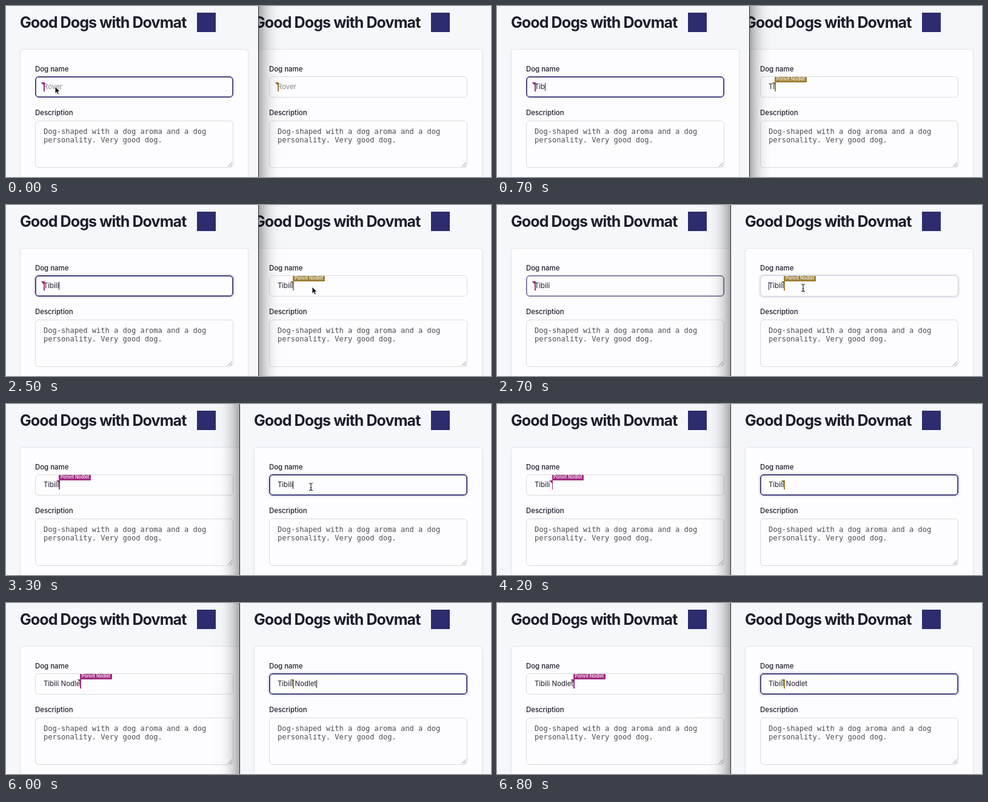
Write an HTML page that moves like this. It is 800 px wide and 282 px high and loops after 6900 ms.

```html
<!DOCTYPE html>
<html lang="en">
<head>
<meta charset="utf-8">
<title>Good Dogs</title>
<style>
  html, body { margin: 0; width: 100%; height: 100%; overflow: hidden; }
  body { position: relative; font: 11.4px Inter, sans-serif; font-optical-sizing: none; color: #1c1d2b; background: #f5f7fa; }
  i { font-style: normal; }
  .win { position: absolute; top: -60px; height: 402px; overflow: hidden; background: #f5f7fa; box-shadow: 0 0 30px rgba(0, 0, 0, .65); }
  #left { left: 0; width: 416px; border-right: 1px solid #26262c; }
  #right { left: 385px; width: 414px; border-left: 1px solid #26262c; }
  .page { position: absolute; left: 0; top: 60px; }
  .page > * { position: absolute; box-sizing: border-box; white-space: pre; }
  h1 { left: 23px; top: 12px; margin: 0; font-size: 25px; line-height: 30px; font-weight: 700; letter-spacing: -.9px; }
  .logo { left: 315px; top: 11px; width: 31px; height: 32px; background: #2d2c6e; }
  .card { left: 23px; top: 71px; width: 377px; height: 260px; background: #fdfcfe; border: 1px solid #e3e6ed; border-radius: 5px; box-shadow: 0 1px 3px rgba(30, 40, 70, .07); }
  .label { left: 48px; line-height: 16px; font-weight: 540; }
  .box { left: 48px; width: 327px; border: 1px solid #d9dce5; border-radius: 6px; background: #fdfcfe; }
  .input { top: 116px; height: 35px; }
  .area { top: 189px; height: 78px; padding: 10px 13px; font: 12.05px/14.4px "DejaVu Sans Mono", monospace; color: #4d4e54; }
  .grip { left: 366px; top: 258px; }
  .value { left: 62px; top: 126px; height: 15px; line-height: 15px; font-weight: 430; display: flex; }
  .hint { color: #85878e; }
  .local, .remote { position: relative; width: 0; }
  .local::after { content: ""; position: absolute; left: 0; top: 1px; width: 1px; height: 13px; background: #22232c; }
  .remote::before { content: ""; position: absolute; left: 0; top: 0; width: 1.5px; height: 15px; background: var(--ink); }
  .remote::after { content: ""; position: absolute; left: -4.5px; top: 0; width: 5px; height: 5px; background: color-mix(in srgb, var(--ink) 75%, #2a2a48); clip-path: polygon(0 0, 100% 0, 100% 100%); }
  .tag { position: absolute; left: 0; top: -9px; padding: 0 2.5px; font-size: 7.4px; line-height: 8.5px; font-weight: 500; color: #fff; background: var(--ink); border-radius: 1px; }
  #left { --ink: #a12c80; }
  #right { --ink: #9f8136; }
  #mouse { position: absolute; z-index: 5; left: 0; top: 0; overflow: visible; }
</style>
</head>
<body>
<div class="win" id="left"></div>
<div class="win" id="right"></div>
<svg id="mouse" width="1" height="1">
  <path id="arrow" d="M0 0V11.3L2.6 8.9L4.3 12.8L6.3 12L4.6 8.1H8Z" fill="#111" stroke="#fff" stroke-width=".8"/>
  <path id="beam" d="M-3 -6Q0 -6 0 -4Q0 -6 3 -6M0 -4V4M-3 6Q0 6 0 4Q0 6 3 6M-1.5 1.5H1.5" fill="none" stroke="#222" stroke-width="1.1"/>
</svg>
<script>
const LOOP = 6900, STEP = 100, LAG = 100;
const NAME = "Tibili Nodlet", FIRST = 6;
const KEYS = [300, 500, 700, 900, 1100, 1400, 3640, 4500, 4700, 4900, 5060, 5500, 6000];
const CLICK = 2660, JUMP = 2800;
const ACTIONS = [0, CLICK, JUMP, ...KEYS];

const page = `<div class="page">
  <h1>Good Dogs with Dovmat</h1><div class="logo"></div><div class="card"></div>
  <div class="label" style="top:96px">Dog name</div><div class="box input"></div>
  <div class="label" style="top:168px">Description</div>
  <div class="box area">Dog-shaped with a dog aroma and a dog\npersonality. Very good dog.</div>
  <svg class="grip" width="8" height="8"><path d="M0 7L7 0M4 7L7 4" stroke="#777" stroke-width=".8"/></svg>
  <div class="value"><i class="local"></i><span class="before"></span><i class="remote"><span class="tag">Ponvit Nodlet</span></i><span class="after"></span></div>
</div>`;

const $ = id => document.getElementById(id);
const clamp = v => Math.max(0, Math.min(1, v));
const between = (t, a, b) => t >= a && t < b;
const show = (el, on) => el.style.visibility = on ? "visible" : "hidden";
const typed = t => KEYS.filter(k => k <= t).length;

function makePane(id) {
  const win = $(id);
  win.innerHTML = page;
  const part = name => win.querySelector("." + name);
  return { input: part("input"), local: part("local"), remote: part("remote"),
    tag: part("tag"), before: part("before"), after: part("after"), win };
}

function drawPane(p, s) {
  const text = NAME.slice(0, s.count);
  p.before.textContent = text.slice(0, s.remoteAt);
  p.after.textContent = text.slice(s.remoteAt) || (s.count ? "" : "Rover");
  p.after.className = s.count ? "after" : "after hint";
  p.local.style.order = s.localAtStart ? -1 : 1;
  show(p.local, s.caret);
  show(p.remote, s.remote);
  show(p.tag, s.tag);
  const edge = `color-mix(in srgb, #2c2b6c ${s.focus * 100}%, #d9dce5)`;
  p.input.style.borderColor = edge;
  p.input.style.boxShadow =
    `inset 0 0 0 ${s.focus * .7}px ${edge}, 0 0 2px 2px rgba(70, 75, 140, ${.17 * s.glow})`;
}

function drawMouse(t) {
  const u = clamp((t - 1650) / 700), e = u * u * (3 - 2 * u);
  const isBeam = t >= CLICK;
  const x = isBeam ? 505 - 2 * clamp((t - 2700) / 600) : 81 + 424 * e;
  const y = isBeam ? 136.5 : 133 + 2 * e + 25 * Math.sin(Math.PI * e);
  show($("arrow"), t < KEYS[0] || between(t, 1700, CLICK));
  show($("beam"), between(t, CLICK, KEYS[FIRST]));
  $("mouse").style.transform = `translate(${x}px, ${y}px)`;
}

const left = makePane("left"), right = makePane("right");

function draw(t) {
  const rightFront = t >= CLICK;
  const here = typed(t), there = typed(t - LAG);
  const lastAction = Math.max(...ACTIONS.filter(a => a <= t));
  const blink = (t - lastAction) % 1000 < 550;

  left.win.style.zIndex = rightFront ? 1 : 2;
  right.win.style.zIndex = rightFront ? 2 : 1;

  drawPane(left, {
    count: rightFront ? there : here,
    remoteAt: t < JUMP ? 0 : there,
    remote: true, tag: t >= JUMP,
    caret: !rightFront && blink,
    localAtStart: here === 0,
    focus: 1 - clamp((t - CLICK) / 150),
    glow: rightFront ? 0 : clamp((t - 1650) / 150)
  });
  drawPane(right, {
    count: rightFront ? here : there,
    remoteAt: FIRST,
    remote: !between(t, 3100, KEYS[FIRST]),
    tag: there > 0 && t < 3100,
    caret: rightFront && blink,
    localAtStart: t < JUMP,
    focus: clamp((t - 2690) / 150),
    glow: clamp((t - CLICK) / 60)
  });
  drawMouse(t);
}

function tick() {
  draw(Math.floor(performance.now() % LOOP / STEP) * STEP);
  requestAnimationFrame(tick);
}
tick();
</script>
</body>
</html>
```
